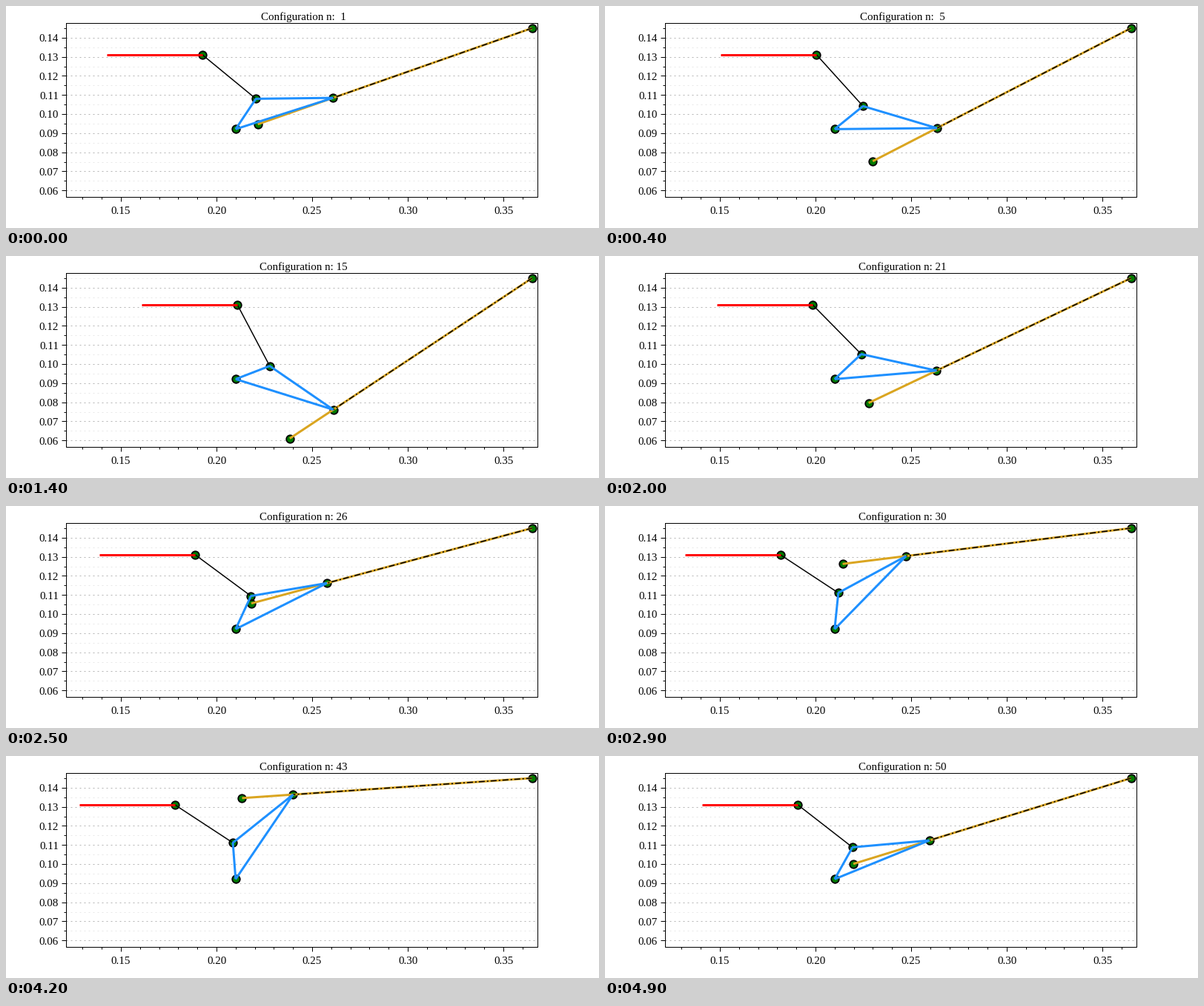
Animation of 800x300 px, one loop 5000 ms. Source, as a matplotlib script:

```python
import numpy as np
import matplotlib.pyplot as plt
from matplotlib.animation import FuncAnimation

WIDTH, HEIGHT, DPI = 800, 300, 100
FRAMES, INTERVAL = 50, 100
SCALE = 2580                       # pixels per data unit
LEFT, RIGHT, TOP, BOTTOM = 81, 717, 23, 258
PX = 72 / DPI                      # one pixel in points

# Linkage dimensions in data units
ANCHOR = np.array([0.365, 0.145])
PIVOT = np.array([0.21, 0.0921])
ROD, LINK, SLIDER = 0.152, 0.0362, 0.05
LONG_ARM, SHORT_ARM = 0.0535, 0.0191
ARM_ANGLE = np.radians(38.5)
SLIDER_Y = 0.131

plt.rcParams["font.family"] = "Liberation Serif"
fig = plt.figure(figsize=(WIDTH / DPI, HEIGHT / DPI), dpi=DPI, facecolor="white")
ax = fig.add_axes([0, 0, 1, 1])
ax.set_xlim(0, WIDTH)
ax.set_ylim(HEIGHT, 0)
ax.axis("off")


def to_px(points):
    x, y = np.transpose(points)
    return 155 + (x - 0.15) * SCALE, 42.8 + (0.14 - y) * SCALE


def line(xs, ys, color, width, z, **style):
    return ax.plot(xs, ys, color=color, lw=width * PX, zorder=z,
                   solid_capstyle="butt", dash_capstyle="butt", **style)[0]


def label(x, y, text, align):
    return ax.text(x, y, text, size=15 * PX, ha=align, va="baseline")


def draw_axes():
    line([LEFT, RIGHT, RIGHT, LEFT, LEFT],
         [TOP, TOP, BOTTOM, BOTTOM, TOP], "black", 1, 2)
    for i in range(12, 30):
        value = i * 0.005
        y = to_px([(0, value)])[1][0]
        major = i % 2 == 0
        line([LEFT - (6 if major else 3), LEFT], [y, y], "black", 1, 2)
        line([LEFT, RIGHT], [y, y], "#b4b4b4" if major else "#e8e8e8", 1, 1,
             ls=(0, (2, 4)))
        if major:
            label(71, y + 5.3, f"{value:.2f}", "right")
    for i in range(13, 37):
        x = to_px([(i * 0.01, 0)])[0][0]
        major = i % 5 == 0
        line([x, x], [BOTTOM, BOTTOM + (6 if major else 3)], "black", 1, 2)
        if major:
            label(x, 280.6, f"{i * 0.01:.2f}", "center")


def unit(angle):
    return np.array([np.cos(angle), np.sin(angle)])


def pose(k):
    """Joint positions: slider, short arm, long arm and rod tip."""
    direction = -unit(0.3 * (1 + np.sin(2 * np.pi * k / FRAMES)))
    offset = PIVOT - ANCHOR
    along = offset @ direction
    reach = along - np.sqrt(LONG_ARM**2 - offset @ offset + along**2)
    long_end = ANCHOR + reach * direction
    dx, dy = long_end - PIVOT
    short_end = PIVOT + SHORT_ARM * unit(np.arctan2(dy, dx) + ARM_ANGLE)
    rise = SLIDER_Y - short_end[1]
    head = np.array([short_end[0] - np.sqrt(LINK**2 - rise**2), SLIDER_Y])
    return head, short_end, long_end, ANCHOR + ROD * direction


draw_axes()
title = label(401.2, 19, "", "center")
joints = ax.plot([], [], "o", ms=10.5 * PX, mfc="#007a00", mec="black",
                 mew=1.8 * PX, zorder=3)[0]
link = line([], [], "black", 1.5, 4)
slider = line([], [], "red", 3, 5)
rod = line([], [], "goldenrod", 3, 6)
guide = line([], [], "black", 1.6, 7, ls=(0, (8 / 1.6, 3 / 1.6, 2 / 1.6, 3 / 1.6)))
triangle = line([], [], "dodgerblue", 3, 8, solid_joinstyle="bevel")


def update(frame):
    k = frame + 1
    head, short_end, long_end, tip = pose(k)
    joints.set_data(*to_px([ANCHOR, PIVOT, head, short_end, long_end, tip]))
    link.set_data(*to_px([head, short_end]))
    slider.set_data(*to_px([head - [SLIDER, 0], head]))
    rod.set_data(*to_px([ANCHOR, tip]))
    guide.set_data(*to_px([ANCHOR, long_end]))
    triangle.set_data(*to_px([PIVOT, short_end, long_end, PIVOT]))
    title.set_text(f"Configuration n: {k:>2}")
    return joints, link, slider, rod, guide, triangle, title


anim = FuncAnimation(fig, update, frames=FRAMES, interval=INTERVAL,
                     repeat=True, repeat_delay=0)
plt.show()
```
